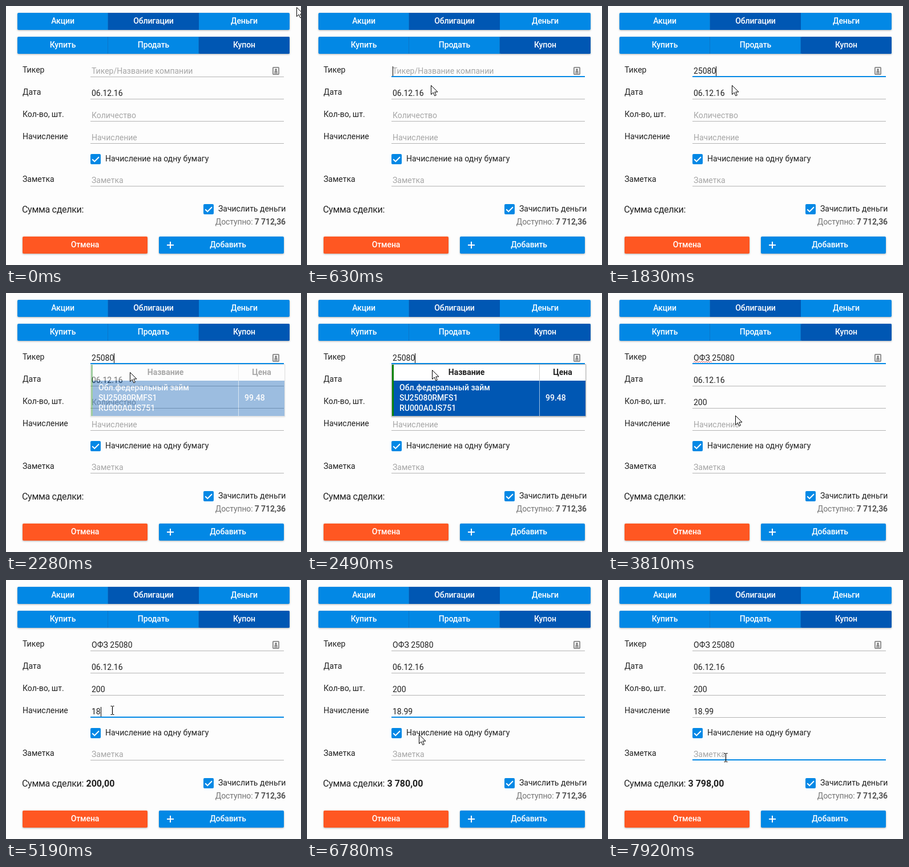
An HTML page that plays this animation: 517 px wide and 455 px high, repeating every 8000 ms.

```html
<!DOCTYPE html>
<html lang="ru">
<meta charset="utf-8">
<title>Купон</title>
<style>
html, body { margin: 0; width: 100%; height: 100%; overflow: hidden; background: #fdfdfd; }
svg { display: block; font: 14px Roboto, Arial, sans-serif; fill: #212121; }
text { white-space: pre; }
.mid { text-anchor: middle; }
.med { font-weight: 500; }
.bold { font-weight: 700; }
.white { fill: #fff; }
.hint { fill: #a6a6a6; }
.tight { letter-spacing: -.12px; }
.big { font-size: 16px; letter-spacing: -.3px; }
.lift { filter: drop-shadow(0 1px 1.5px rgba(0,0,0,.3)); }
</style>
<svg id="stage" width="517" height="455" viewBox="0 0 517 455"></svg>
<script>
const BLUE = '#0288e5', NAVY = '#0057b3', LOOP = 8000;
const stage = document.getElementById('stage');
const $ = id => document.getElementById(id);

const rect = (x, y, w, h, fill, more = '') =>
  `<rect x="${x}" y="${y}" width="${w}" height="${h}" fill="${fill}" ${more}/>`;
const text = (x, y, s, cls = '', more = '') =>
  `<text x="${x}" y="${y}" class="${cls}" ${more}>${s}</text>`;
const caption = (x, y, s) => text(x, y, s, 'mid med white tight');

const tabs = (y, names, active) => `<g class="lift">${rect(20, y, 477, 30, BLUE, 'rx="2"')}` +
  rect(178, y, 1, 30, '#0a76cb') + rect(337, y, 1, 30, '#0a76cb') +
  rect(20 + active * 159, y, 159, 30, NAVY, active == 2 ? 'rx="2"' : '') + '</g>' +
  names.map((n, i) => caption(99.5 + i * 159, y + 19, n)).join('');

const button = (x, fill, label, mid) =>
  `<g class="lift">${rect(x, 405, 219, 30, fill, 'rx="2"')}</g>` + caption(mid, 424, label);

const check = (x, y, label) => rect(x, y, 18, 18, BLUE, 'rx="2"') +
  `<path d="M${x + 3.2} ${y + 9.2}l4 4 7.8-8" fill="none" stroke="#fff" stroke-width="2"/>` +
  text(x + 26, y + 13, label);

// Form rows: label, label baseline, placeholder
const rows = [
  ['Тикер', 117, 'Тикер/Название компании'],
  ['Дата', 156, ''],
  ['Кол-во, шт.', 195, 'Количество'],
  ['Начисление', 234, 'Начисление'],
  ['Заметка', 309, 'Заметка']
];
const row = ([label, y, hint], i) => text(29, y, label) +
  text(150, y + 2, hint, 'hint', `id="hint${i}"`) + text(150, y + 2, '', '', `id="val${i}"`) +
  rect(148, y + 7, 339, 1, '#b4b4b4') + rect(148, y + 6, 339, 2, BLUE, `id="line${i}"`);

const zigzag = 'M150 122' + 'l2-2l2 2'.repeat(8);

stage.innerHTML =
  tabs(12, ['Акции', 'Облигации', 'Деньги'], 1) +
  tabs(54, ['Купить', 'Продать', 'Купон'], 2) +
  rows.map(row).join('') +
  `<path id="wavy" d="${zigzag}" fill="none" stroke="#e53935" stroke-width=".8"/>
  <g fill="none" stroke="#858585" stroke-width="1.8">
    <rect x="467.9" y="107.9" width="10.2" height="12.2" rx="1"/>
    <path d="M470 117.5h6M470.5 115h5"/></g>
  <circle cx="473" cy="112" r="2" fill="#858585"/>` +
  check(148, 260, 'Начисление на одну бумагу') +
  check(346, 348, 'Зачислить деньги') +
  text(28, 363, 'Сумма сделки:', 'big') +
  text(140.5, 363, '', 'bold', 'id="sum" font-size="16"') +
  text(490, 384, 'Доступно: <tspan class="bold" fill="#555">7 712,36</tspan>', 'tight', 'fill="#757575" text-anchor="end"') +
  button(29, '#ff5722', 'Отмена', 138.5) +
  button(268, BLUE, 'Добавить', 389) +
  '<path d="M282 420h12M288 414v12" stroke="#fff" stroke-width="2"/>' +
  rect(0, 0, 1, 17, '#000', 'id="caret"') +
  '<g id="menu"><g style="filter:drop-shadow(0 1px 1px rgba(0,0,0,.3))">' +
  rect(148.5, 125.5, 340, 91, '#fff', 'stroke="#bbb"') + '</g>' +
  rect(152, 154, 336, 62, NAVY) + rect(149, 126, 3, 90, '#0a820a') +
  rect(407, 126, 1, 28, '#ccc') + rect(407, 154, 1, 62, '#9dbfe2') +
  text(279.5, 144, 'Название', 'mid bold') + text(448, 144, 'Цена', 'mid bold') +
  ['Обл.федеральный займ', 'SU25080RMFS1', 'RU000A0JS751']
    .map((s, i) => text(162, 171 + i * 18, s, 'med white')).join('') +
  text(418, 189, '99.48', 'med white') + '</g>' +
  `<path id="arrow" d="M.5.5V16.5L4.2 13 6.8 18.8 9.3 17.7 6.8 12H12Z" fill="#fff" stroke="#000"/>
  <path id="beam" d="M-3-7.5h2.5M.5-7.5H3M0-7V7M-3 7.5h2.5M.5 7.5H3" fill="none" stroke="#000" stroke-width="1.2"/>`;

// Last entry of [time, value] pairs reached at t
const at = (t, list) => list.reduce((v, [start, next]) => t >= start ? next : v, '');
const ramp = (t, a, b) => Math.min(1, Math.max(0, (t - a) / (b - a)));

const ticker = [[1050, '2'], [1170, '25'], [1380, '250'], [1620, '2508'], [1830, '25080'], [3000, 'ОФЗ 25080']];
const payout = [[4920, '1'], [5190, '18'], [5490, '18.'], [5610, '18.9'], [6090, '18.99']];
const total = [[5070, '200,00'], [5370, '3 600,00'], [5970, '3 780,00'], [7200, '3 798,00']];
const focus = [[0, -1], [420, 0], [4200, 3], [7170, 4]];
const carets = [[0, 0], [600, 1], [3570, 0], [4050, 1], [4200, 0], [4440, 1], [6570, 0], [7380, 1], [7920, 0]];

// Pointer: time, x, y of the hot spot
const path = [
  [0, 509, 2], [30, 509, 2], [210, 237, 122], [450, 237, 122], [630, 217, 139],
  [2460, 217, 139], [2490, 219, 135], [2640, 250, 88], [2760, 259, 115], [2880, 257, 185],
  [3570, 257, 185], [3810, 223, 215], [4050, 186, 229], [6540, 186, 229], [7020, 206, 312], [LOOP, 206, 312]
];
const beams = [[0, 0], [180, 1], [510, 0], [3900, 1], [6600, 0], [6930, 1]];

function pointer(t) {
  const i = path.findIndex(p => p[0] > t), [t0, x0, y0] = path[i - 1], [t1, x1, y1] = path[i];
  const k = ramp(t, t0, t1);
  return [x0 + (x1 - x0) * k, y0 + (y1 - y0) * k];
}

function draw(t) {
  const values = [at(t, ticker), '06.12.16', t >= 3000 ? '200' : '', at(t, payout), ''];
  const now = at(t, focus);
  values.forEach((v, i) => {
    $('val' + i).textContent = v;
    $('hint' + i).style.opacity = v ? 0 : 1;
    const on = focus.find(f => f[1] === i), off = on && focus[focus.indexOf(on) + 1];
    $('line' + i).style.opacity = on ? ramp(t, on[0] - 30, on[0] + 180) - (off ? ramp(t, off[0] - 30, off[0] + 180) : 0) : 0;
  });
  $('sum').textContent = at(t, total);
  $('wavy').style.opacity = t >= 3030 && t < 4200 ? 1 : 0;

  const caret = $('caret');
  caret.style.opacity = at(t, carets);
  if (now >= 0) {
    const end = values[now] ? $('val' + now).getComputedTextLength() : 0;
    caret.setAttribute('x', 150 + Math.round(end));
    caret.setAttribute('y', rows[now][1] - 11);
  }
  $('menu').style.opacity = ramp(t, 2190, 2430) - ramp(t, 2970, 3120);

  const [x, y] = pointer(t), beam = at(t, beams);
  $('arrow').style.opacity = 1 - beam;
  $('beam').style.opacity = beam;
  $('arrow').setAttribute('transform', `translate(${Math.round(x)} ${Math.round(y)})`);
  $('beam').setAttribute('transform', `translate(${Math.round(x) + .5} ${Math.round(y)})`);
}

function tick() {
  draw(performance.now() % LOOP);
  requestAnimationFrame(tick);
}
tick();
</script>
</html>
```
